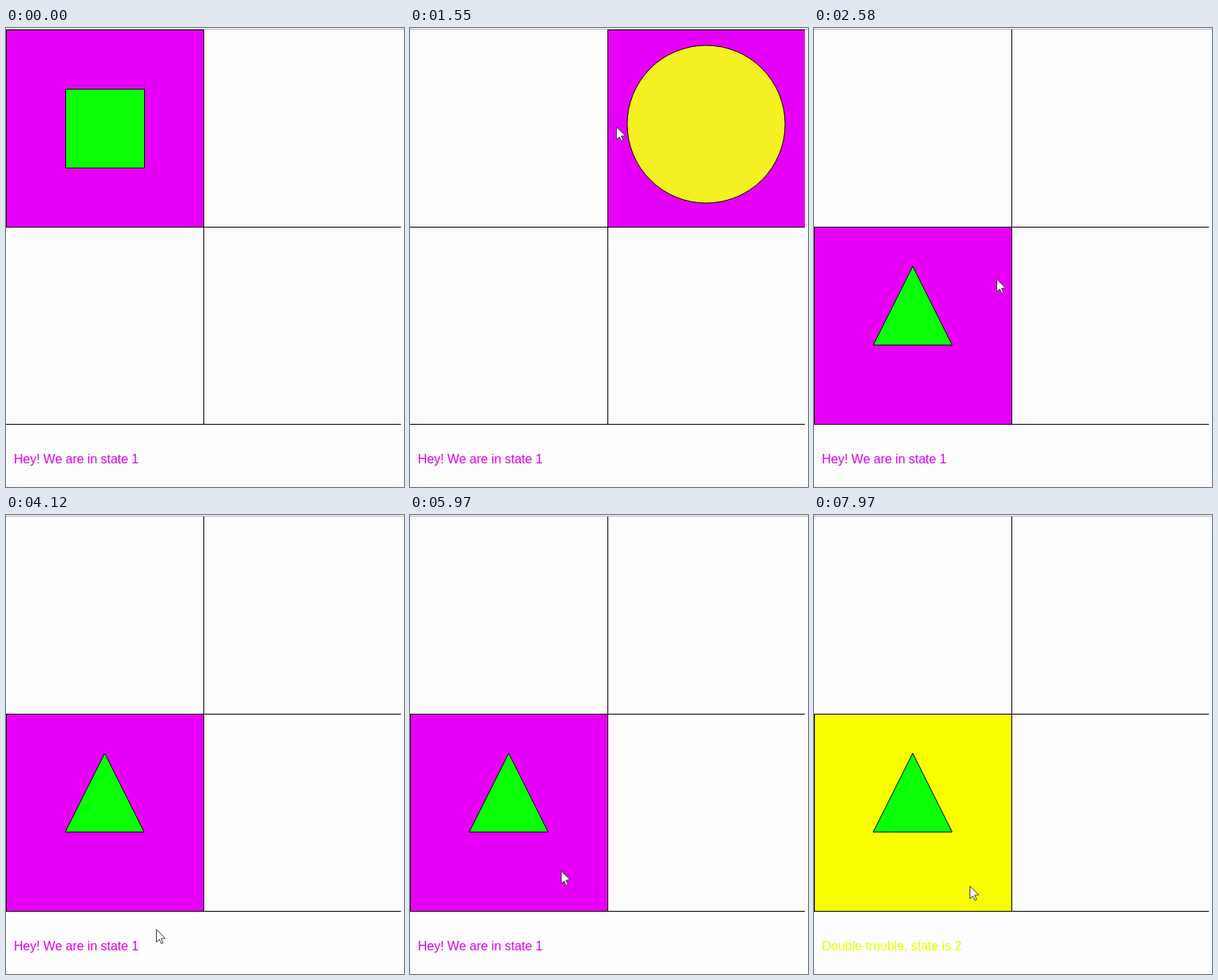
These frames come from a looping animation (504x582 px, 8000 ms). An HTML page with a canvas:

```html
<!DOCTYPE html>
<html lang="en">
<head>
<meta charset="utf-8">
<title>Quadrants</title>
<style>
html, body { margin: 0; width: 100%; height: 100%; overflow: hidden; background: #fdfdfd; }
canvas { display: block; }
</style>
</head>
<body>
<canvas id="stage" width="504" height="582"></canvas>
<script>
const ctx = document.getElementById('stage').getContext('2d');
const LOOP = 8000, SIDE = 250, TOP = 2;
const PAPER = '#fdfdfd', GREEN = '#0aff06', YELLOW = '#f4f022', INK = '#000';
const PRESS = 6490, RELEASE = 6720, RING_END = 6780;

const STATES = [
  { color: '#e600f8', text: '#d800e8', label: 'Hey! We are in state 1' },
  { color: '#f9ff00', text: '#e4ff00', label: 'Double trouble, state is 2' }
];

const ENTRY = { x: -14, y: 118 };
const MOVES = [
  { from: 50, to: 270, x: 200, y: 122 },
  { from: 1450, to: 1680, x: 340, y: 129 },
  { from: 2020, to: 2180, x: 255, y: 317 },
  { from: 2500, to: 2750, x: 180, y: 321 },
  { from: 3470, to: 3800, x: 190, y: 525 },
  { from: 4420, to: 4720, x: 91, y: 565 },
  { from: 5420, to: 5750, x: 210, y: 505 },
  { from: 5750, to: 6070, x: 182, y: 427 },
  { from: 7940, to: 7970, x: 197, y: 470 }
];
// The pointer swings to and fro under the label
const SWING = { from: 4420, to: 5280, mid: 131, reach: 60, period: 630 };

const mix = (a, b, k) => a + (b - a) * k;

function pointerAt(t) {
  let { x, y } = ENTRY;
  for (const move of MOVES) {
    const k = Math.min(1, Math.max(0, (t - move.from) / (move.to - move.from)));
    x = mix(x, move.x, k);
    y = mix(y, move.y, k);
  }
  if (t > SWING.from && t < SWING.to) {
    x = SWING.mid + SWING.reach * Math.cos((t - SWING.from) / SWING.period * Math.PI * 2);
  }
  return [Math.round(x), Math.round(y)];
}

function polygon(points) {
  ctx.beginPath();
  points.forEach(([x, y]) => ctx.lineTo(x, y));
  ctx.closePath();
}

function paint(fill) {
  ctx.fillStyle = fill;
  ctx.fill();
  ctx.stroke();
}

function circle(x, y, radius) {
  ctx.beginPath();
  ctx.arc(x, y, radius, 0, Math.PI * 2);
}

// Boxes and lines sit on pixel centres to stay crisp
function box(x, y, size, fill) {
  ctx.beginPath();
  ctx.rect(x + 0.5, y + 0.5, size, size);
  paint(fill);
}

function line(x, y, width, height) {
  ctx.fillStyle = INK;
  ctx.fillRect(x, y, width, height);
}

function drawShape(col, row) {
  if (!col && !row) {
    box(75, 75, 100, GREEN);
  } else if (!row) {
    circle(375, 120, 100);
    paint(YELLOW);
  } else if (!col) {
    polygon([[125, 300], [75, 400], [175, 400]]);
    paint(GREEN);
  }
}

function drawBoard(col, row, color) {
  ctx.save();
  ctx.beginPath();
  ctx.rect(0, TOP, SIDE * 2, 580);
  ctx.clip();
  ctx.translate(0, TOP);
  ctx.lineWidth = 1;
  ctx.strokeStyle = INK;
  box(col * SIDE, row * SIDE, SIDE, color);
  line(SIDE, 0, 1, SIDE * 2);
  line(0, SIDE, SIDE * 2, 1);
  line(0, SIDE * 2, SIDE * 2, 1);
  drawShape(col, row);
  ctx.restore();
}

function drawRing(x, y) {
  ctx.strokeStyle = 'rgba(235, 45, 35, 0.7)';
  ctx.lineWidth = 4;
  circle(x + 1, y, 32);
  ctx.stroke();
}

function drawPointer(x, y) {
  ctx.save();
  ctx.translate(x + 0.5, y + 0.5);
  polygon([[0, 0], [0, 16], [3.7, 12.6], [6.2, 18], [8.4, 17], [6, 11.6], [11, 11.2]]);
  ctx.lineWidth = 1;
  ctx.strokeStyle = '#3c3c50';
  paint('#fff');
  ctx.restore();
}

function draw(t) {
  const [x, y] = pointerAt(t);
  const state = STATES[t < RELEASE ? 0 : 1];

  ctx.fillStyle = PAPER;
  ctx.fillRect(0, 0, 504, 582);
  ctx.fillStyle = '#b4b4b8';
  ctx.fillRect(0, 1, 504, 1);
  drawBoard(x < SIDE ? 0 : 1, y < SIDE + TOP ? 0 : 1, state.color);

  ctx.font = '16px "Liberation Sans", Arial, sans-serif';
  ctx.fillStyle = state.text;
  ctx.fillText(state.label, 10, 552);

  if (t >= PRESS && t < RING_END) drawRing(x, y);
  drawPointer(x, y);
}

const start = performance.now();
function tick() {
  draw((performance.now() - start) % LOOP);
  requestAnimationFrame(tick);
}
tick();
</script>
</body>
</html>
```
